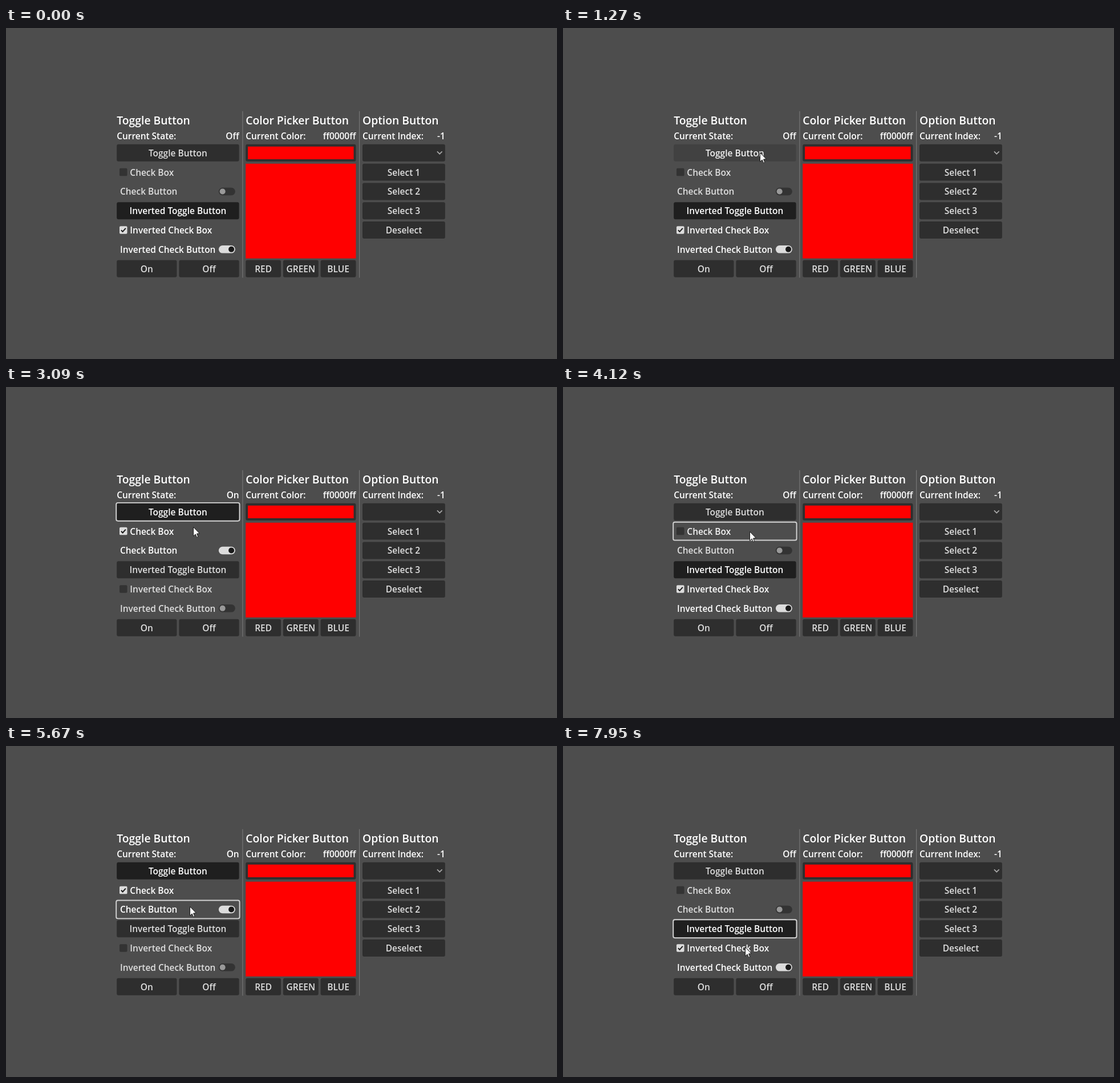
An HTML page with a canvas for the animation above (8 s loop, 966x580 px).

```html
<!DOCTYPE html>
<html lang="en">
<head>
<meta charset="utf-8">
<title>Button states</title>
<style>
  html, body { margin: 0; width: 100%; height: 100%; overflow: hidden; background: #4d4d4d; }
  canvas { display: block; }
</style>
</head>
<body>
<canvas id="stage" width="966" height="580"></canvas>
<script>
const ctx = document.getElementById('stage').getContext('2d');
const LOOP = 8000;
const SCALE = 0.966;            // the layout is built on a 1000 px wide grid
const ROW_TOP = 211, ROW_STEP = 35, ROW_HEIGHT = 31;
const COLORS = {
  back: '#4d4d4d', normal: '#2e2e2e', hover: '#414141', pressed: '#1f1f1f',
  text: '#dfdfdf', textBright: '#f2f2f2', white: '#fff', line: '#808080',
  ring: '#d2d2d2', iconOff: '#333', iconOn: '#dcdcdc', knobOff: '#999', iconDark: '#1a1a1a'
};

const linear = p => p;
const smooth = p => p * p * (3 - 2 * p);

// Pointer moves: first step, last step, step count, destination, easing
const pointerStart = [654, 569];
const moves = [
  [500, 840, 6, [509, 423], linear],
  [910, 1270, 6, [345, 218], smooth],
  [1340, 1410, 2, [345, 214], linear],
  [2670, 3160, 8, [327, 246], smooth],
  [3310, 3510, 4, [325, 263], smooth],
  [3770, 3980, 4, [327, 253], smooth],
  [4650, 5070, 7, [322, 281], smooth],
  [6330, 6680, 6, [319, 320], smooth],
  [7810, 7950, 3, [319, 352], smooth]
];

// Clicks: mouse down, mouse up, row
const clicks = [[2070, 2140, 0], [4050, 4120, 1], [5530, 5670, 2], [7090, 7220, 3]];

const rowY = row => ROW_TOP + row * ROW_STEP;

function pointerAt(t) {
  if (t < moves[0][0]) return null;
  let pos = pointerStart;
  for (const [start, end, count, to, ease] of moves) {
    if (t < start) break;
    const step = Math.floor((t - start) / (end - start) * (count - 1) + 0.05) + 1;
    const p = ease(Math.min(1, step / count));
    pos = pos.map((v, i) => v + (to[i] - v) * p);
  }
  return pos.map(Math.round);
}

function stateAt(t) {
  const state = { pointer: pointerAt(t), on: false, focus: -1, held: -1 };
  for (const [down, up, row] of clicks) {
    if (t >= down) state.focus = row;
    if (t >= up) state.on = !state.on;
    else if (t >= down) state.held = row;
  }
  return state;
}

function box(x, y, w, h, color, radius = 0) {
  ctx.fillStyle = color;
  ctx.beginPath();
  ctx.roundRect(x, y, w, h, radius);
  ctx.fill();
}

function disc(x, y, r, color) {
  ctx.fillStyle = color;
  ctx.beginPath();
  ctx.arc(x, y, r, 0, 2 * Math.PI);
  ctx.fill();
}

function polyline(points, color, width) {
  ctx.strokeStyle = color;
  ctx.lineWidth = width;
  ctx.beginPath();
  points.forEach(([x, y]) => ctx.lineTo(x, y));
  ctx.stroke();
}

function text(str, x, middle, color = COLORS.white, align = 'left', size = 16) {
  ctx.font = `600 ${size}px "Open Sans", sans-serif`;
  ctx.textAlign = align;
  ctx.fillStyle = color;
  ctx.fillText(str, x, middle + size * 0.388);
}

function isOver(pointer, x, y, w, h) {
  if (!pointer) return false;
  const [px, py] = pointer.map(v => v / SCALE);
  return px >= x && px < x + w && py >= y && py < y + h;
}

function button(label, x, row, w, pointer) {
  const y = rowY(row);
  const over = isOver(pointer, x, y, w, ROW_HEIGHT);
  box(x, y, w, ROW_HEIGHT, over ? COLORS.hover : COLORS.normal, 3);
  text(label, x + w / 2, y + 15.5, over ? COLORS.textBright : COLORS.text, 'center');
}

function checkIcon(y, value) {
  box(206, y - 7, 14, 14, value ? COLORS.iconOn : COLORS.iconOff, 2);
  if (value) polyline([[209, y + 0.2], [211.8, y + 3], [217.2, y - 3.2]], COLORS.iconDark, 2);
}

function switchIcon(y, value) {
  box(386, y - 7, 30, 14, value ? COLORS.iconOn : COLORS.iconOff, 7);
  disc(value ? 409 : 393, y, 5.2, value ? COLORS.iconDark : COLORS.knobOff);
}

function toggle(kind, label, row, value, state) {
  const x = 201, w = 222, y = rowY(row), middle = y + 15.5;
  const over = isOver(state.pointer, x, y, w, ROW_HEIGHT);
  const focused = state.focus === row;
  const pressed = state.held === row ? !value : value;
  const color = pressed ? COLORS.white : over || focused ? COLORS.textBright : COLORS.text;

  if (kind === 'button') {
    box(x, y, w, ROW_HEIGHT, pressed ? COLORS.pressed : over ? COLORS.hover : COLORS.normal, 3);
    text(label, x + w / 2, middle, color, 'center');
  } else if (kind === 'check') {
    checkIcon(middle, value);
    text(label, 225, middle, color);
  } else {
    switchIcon(middle, value);
    text(label, 207, middle, color);
  }
  if (focused) {
    ctx.strokeStyle = COLORS.ring;
    ctx.lineWidth = 2;
    ctx.beginPath();
    ctx.roundRect(x - 1, y - 1, w + 2, ROW_HEIGHT + 2, 3);
    ctx.stroke();
  }
}

function heading(title, label, value, left, right) {
  text(title, left, 166.7, COLORS.white, 'left', 20);
  text(label, left, 195.7);
  text(value, right, 195.7, COLORS.white, 'right');
}

function drawPointer([x, y], held) {
  if (held) disc(x, y, 11.8, 'rgba(255, 255, 0, 0.5)');
  const outline = [[0.5, 0.5], [0.5, 16.3], [4.1, 12.9], [6.5, 18.4], [8.8, 17.4], [6.5, 12.1], [11.3, 11.7]];
  ctx.beginPath();
  outline.forEach(([dx, dy]) => ctx.lineTo(x + dx, y + dy));
  ctx.closePath();
  ctx.fillStyle = '#fff';
  ctx.fill();
  ctx.strokeStyle = '#1c1c1c';
  ctx.lineWidth = 1;
  ctx.stroke();
}

function draw(t) {
  const state = stateAt(t);
  const { pointer, on } = state;
  ctx.setTransform(1, 0, 0, 1, 0, 0);
  box(0, 0, 966, 580, COLORS.back);
  ctx.scale(SCALE, SCALE);

  for (const x of [429, 641]) box(x, 151, 1, 302, COLORS.line);

  heading('Toggle Button', 'Current State:', on ? 'On' : 'Off', 201, 423);
  ['', 'Inverted '].forEach((prefix, i) => {
    const value = i ? !on : on;
    toggle('button', prefix + 'Toggle Button', i * 3, value, state);
    toggle('check', prefix + 'Check Box', i * 3 + 1, value, state);
    toggle('switch', prefix + 'Check Button', i * 3 + 2, value, state);
  });
  button('On', 201, 6, 109, pointer);
  button('Off', 314, 6, 109, pointer);

  heading('Color Picker Button', 'Current Color:', 'ff0000ff', 435, 635);
  button('', 435, 0, 200, pointer);
  box(439, 215, 192, 23, '#f00');
  box(435, 246, 200, 172, '#f00');
  ['RED', 'GREEN', 'BLUE'].forEach((name, i) => button(name, 435 + i * 68, 6, 64, pointer));

  heading('Option Button', 'Current Index:', '-1', 647, 797);
  ['', 'Select 1', 'Select 2', 'Select 3', 'Deselect']
    .forEach((name, i) => button(name, 647, i, 150, pointer));
  polyline([[782.5, 224], [787, 228.5], [791.5, 224]], '#a8a8a8', 1.8);

  ctx.setTransform(1, 0, 0, 1, 0, 0);
  if (pointer) drawPointer(pointer, state.held >= 0);
}

const startTime = performance.now();
function tick() {
  draw((performance.now() - startTime) % LOOP);
  requestAnimationFrame(tick);
}
tick();
</script>
</body>
</html>
```
